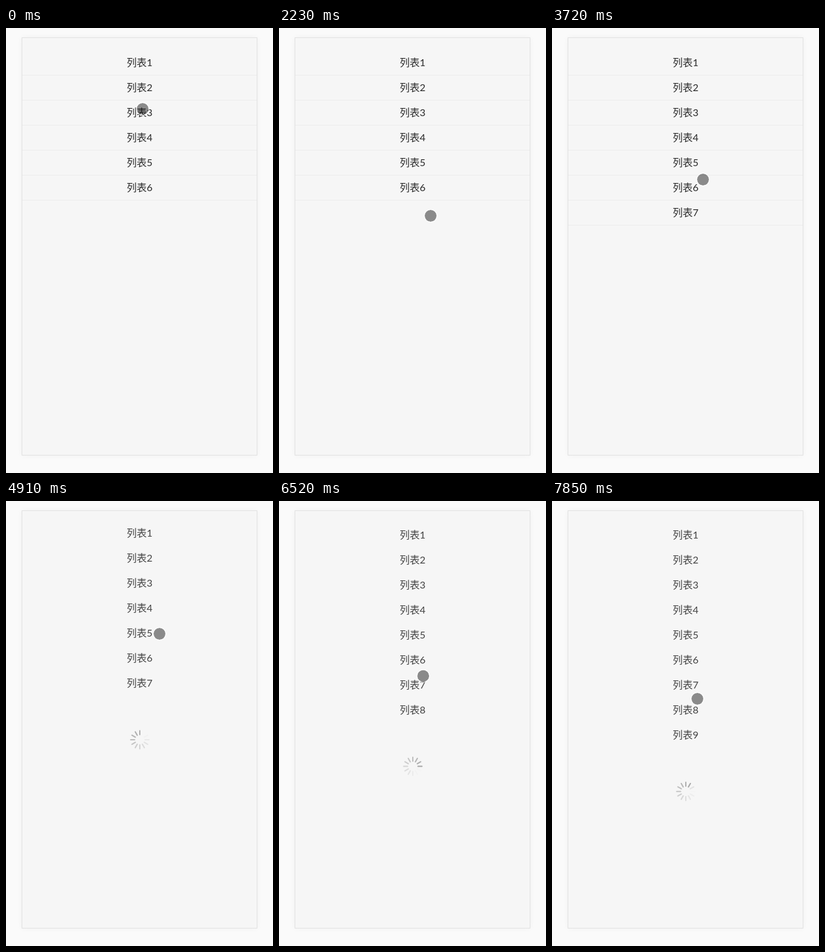
Write an HTML page with a canvas that moves like this. It is 427 px wide and 712 px high and loops after 8000 ms.

```html
<!DOCTYPE html>
<html lang="zh">
<head>
<meta charset="utf-8">
<style>
html, body { margin: 0; width: 100%; height: 100%; overflow: hidden; background: #fafafa; }
canvas { display: block; }
</style>
</head>
<body>
<canvas id="stage" width="427" height="712"></canvas>
<script>
const ctx = document.getElementById('stage').getContext('2d');
const LOOP = 8000, STEP = 148.1, ROW = 40;
const DRAG = 340, SETTLE = 850, PULL = 28;
const releases = [2740, 4390, 5870, 7190];

// Pointer stops: step, x, y
const stops = [
  [0, 218.5, 129.5], [6, 196, 366], [11, 273, 27], [15, 242.5, 300.5],
  [19, 237, 170], [25, 241.5, 242.5], [33, 245.5, 212.5], [37, 231, 300],
  [40, 229.5, 165.5], [46, 231, 318], [49, 226.5, 255.5], [53, 232.5, 316.5]
];

// cubic-bezier(.25, .1, .25, 1)
function ease(x) {
  let lo = 0, hi = 1, s;
  for (let i = 0; i < 20; i++) {
    s = (lo + hi) / 2;
    if (0.75 * s * (1 - s) + s ** 3 < x) lo = s; else hi = s;
  }
  return 0.3 * s * (1 - s) ** 2 + 3 * s * s * (1 - s) + s ** 3;
}

function pointerAt(step) {
  const i = Math.max(1, stops.findIndex(s => s[0] >= step));
  const [s0, x0, y0] = stops[i - 1], [s1, x1, y1] = stops[i];
  const p = (1 - Math.cos(Math.PI * (step - s0) / (s1 - s0))) / 2;
  return [x0 + (x1 - x0) * p, y0 + (y1 - y0) * p];
}

// Each pull drags the list up; it settles while loading, then gains a row.
function listAt(t) {
  const list = { count: 6, shift: 0, loading: false };
  for (const release of releases) {
    const age = t - release;
    if (age >= SETTLE) list.count++;
    else if (age >= 0) {
      list.loading = true;
      list.shift = -PULL * (1 - ease(age / SETTLE));
    } else if (age > -DRAG) list.shift = -PULL * (1 + age / DRAG);
  }
  return list;
}

function drawPanel() {
  ctx.fillStyle = '#fafafa';
  ctx.fillRect(0, 0, 427, 712);
  ctx.save();
  ctx.shadowColor = 'rgba(0,0,0,.045)';
  ctx.shadowBlur = 8;
  ctx.fillStyle = '#f6f6f6';
  ctx.fillRect(25, 15, 377, 669);
  ctx.restore();
  ctx.strokeStyle = '#e2e2e2';
  ctx.lineWidth = 1;
  ctx.strokeRect(25.5, 15.5, 376, 668);
}

function drawList({ count, shift }) {
  const still = shift === 0;
  ctx.font = '16px Lato, "Noto Sans CJK SC", "Noto Sans CJK", sans-serif';
  for (let i = 0; i < count; i++) {
    const y = 55 + i * ROW + shift;
    ctx.fillStyle = still ? '#2b2b2b' : '#444';
    ctx.fillText('列表' + (i + 1), 193, y + 6);
    if (still) {
      ctx.fillStyle = '#ececec';
      ctx.fillRect(26, y + 20, 375, 1);
    }
  }
}

function drawSpinner(y, head) {
  ctx.save();
  ctx.translate(214, y);
  ctx.strokeStyle = '#a6a6a6';
  ctx.lineWidth = 2;
  ctx.lineCap = 'round';
  for (let k = 0; k < 12; k++) {
    const lag = ((head - k * 30) % 360 + 360) % 360 / 30;
    ctx.globalAlpha = lag > 11 ? lag - 11 : Math.max(0, 1 - lag / 10.5);
    ctx.beginPath();
    ctx.moveTo(0, -8.3);
    ctx.lineTo(0, -14.6);
    ctx.stroke();
    ctx.rotate(Math.PI / 6);
  }
  ctx.restore();
}

function drawPointer([x, y]) {
  ctx.beginPath();
  ctx.arc(x, y, 9.5, 0, 7);
  ctx.fillStyle = 'rgba(0,0,0,.44)';
  ctx.fill();
  ctx.beginPath();
  ctx.arc(x, y, 10.1, 0, 7);
  ctx.strokeStyle = 'rgba(255,255,255,.75)';
  ctx.lineWidth = 1.2;
  ctx.stroke();
}

function draw(now) {
  const step = Math.min(53, Math.floor(now % LOOP / STEP));
  const t = step * STEP;
  const list = listAt(t);
  drawPanel();
  drawList(list);
  if (list.loading) drawSpinner(105.5 + list.count * ROW + list.shift, t / 2 + 73);
  drawPointer(pointerAt(step));
}

const began = performance.now();
function tick() {
  draw(performance.now() - began);
  requestAnimationFrame(tick);
}
tick();
</script>
</body>
</html>
```
